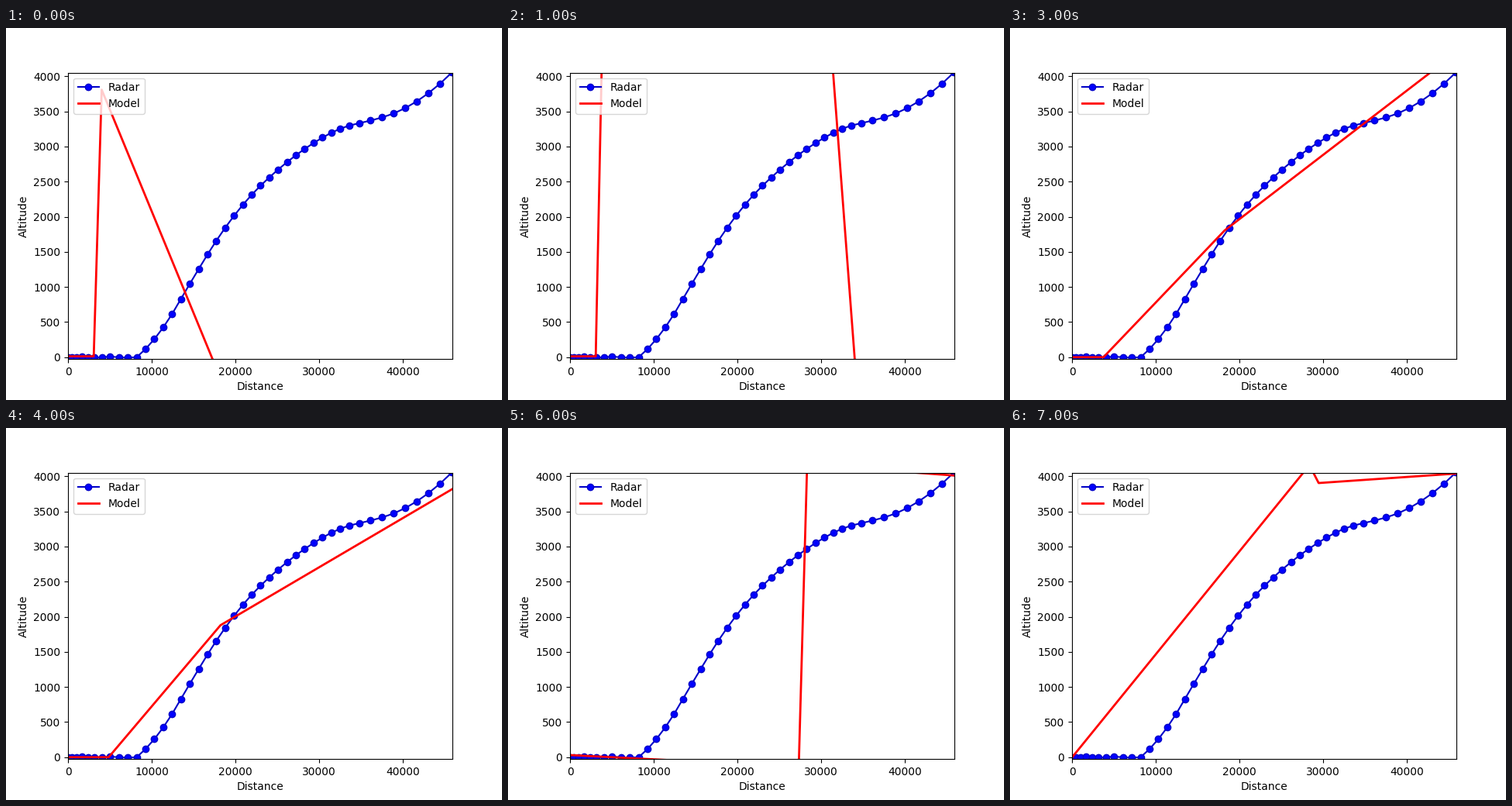
A matplotlib script for the animation above (8000 ms loop, 640 by 480 pixels).

```python
import numpy as np
import matplotlib.pyplot as plt
from matplotlib.animation import FuncAnimation

POINTS = 44
X_MAX = 45910


def radar_track():
    """Integrate ground speed, then climb rate, into a flight path."""
    i = np.arange(POINTS)
    step = np.interp(i[:-1], [0, 7, 32, 36, 42],
                     [460, 1057, 1057, 1370, 1410])
    x = np.append(0, np.cumsum(step))
    rate = np.interp(
        (x[1:] + x[:-1]) / 2,
        [7700, 8700, 13000, 16500, 23000, 31000, 34500, 37500, 45900],
        [0, .11, .205, .195, .116, .065, .025, .034, .12])
    y = np.append(0, np.cumsum(rate * step))
    # slight waver before take-off
    y += np.where(x < 8500, 7 * np.sin((i - 2) * np.pi / 2), 0)
    return x, y


def bent(start, corner1, corner2, end):
    """Three straight pieces across the whole width."""
    return [(0, start), corner1, corner2, (X_MAX, end)]


def climb(t):
    """Ground run, climb and cruise; t shifts the fit from steep to late."""
    return bent(0, (3590 + 1247 * t, 0), (18200, 1793 + 87 * t),
                4410 - 590 * t)


STEPS = [
    bent(12, (3050, 12), (4000, 3810), -8330),
    bent(12, (3050, 12), (9670, 38400), -18840),
    climb(0),
    climb(0.12),
    climb(1),
    bent(0, (26250, 2800), (27350, 2890), 4000),
    bent(30, (27310, -136), (28310, 4165), 4012),
    bent(0, (28350, 4160), (29450, 3905), 4040),
]

fig, ax = plt.subplots(figsize=(6.4, 4.8), dpi=100)
ax.plot(*radar_track(), "o-", color="#0000c8", markerfacecolor="b",
        label="Radar")
model, = ax.plot([], [], "r", linewidth=2, label="Model")
ax.set(xlim=(-25, X_MAX), ylim=(-27, 4053),
       xlabel="Distance", ylabel="Altitude")
ax.legend(loc="upper left")


def update(i):
    model.set_data(*zip(*STEPS[i]))
    return model,


anim = FuncAnimation(fig, update, frames=len(STEPS), interval=1000,
                     repeat=True)
plt.show()
```
